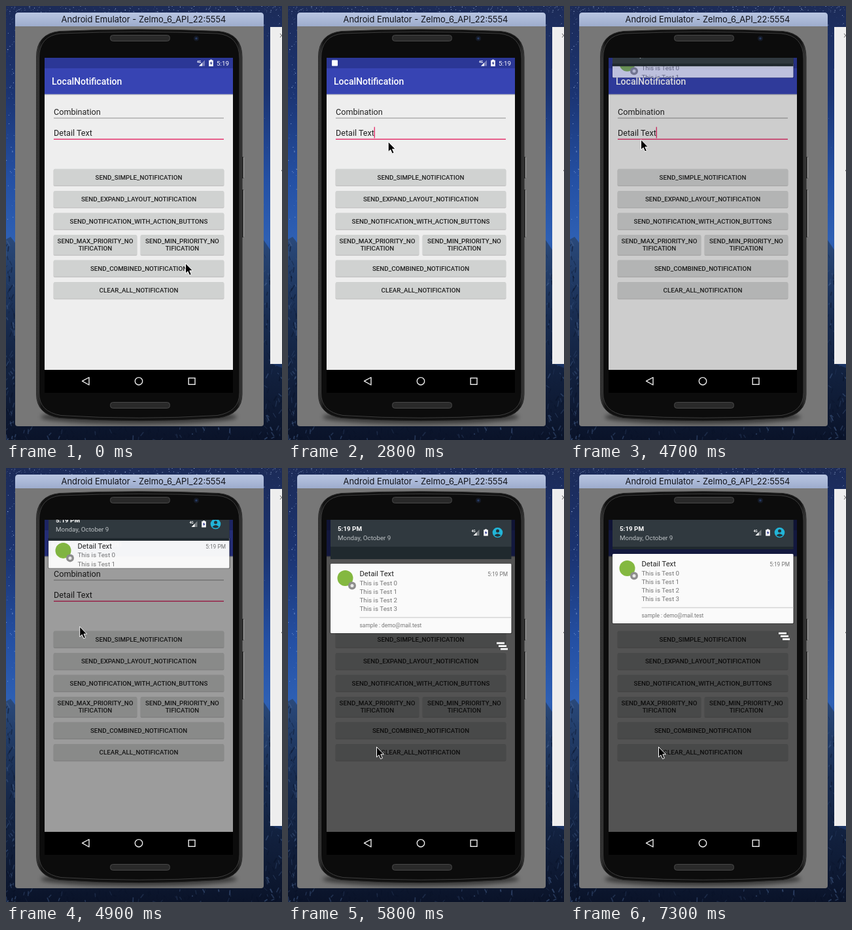
An HTML page for the animation above (7.4 s loop, 422 px wide and 662 px high).

```html
<!DOCTYPE html>
<html lang="en">
<head>
<meta charset="utf-8">
<title>Local notification demo</title>
<style>
  html, body { margin: 0; width: 100%; height: 100%; overflow: hidden; background: #0d1833; }
  svg { display: block; width: 422px; height: 662px; }
  text { font-family: Roboto, sans-serif; }
  .mid { text-anchor: middle; }
  .end { text-anchor: end; }
  .btn { font-size: 9.8px; font-weight: 500; fill: #202020; text-anchor: middle; }
  .field { font-size: 12.6px; fill: #212121; }
  .line { font-size: 9.8px; fill: #747474; }
  .small { font-size: 8.4px; fill: #757575; }
</style>
</head>
<body>
<svg viewBox="0 0 422 662" xmlns="http://www.w3.org/2000/svg">
  <defs>
    <linearGradient id="sky" x2="0" y2="1">
      <stop offset="0" stop-color="#1c2b58"/>
      <stop offset=".2" stop-color="#1b3472"/>
      <stop offset=".4" stop-color="#2450a4"/>
      <stop offset=".54" stop-color="#2e60b4"/>
      <stop offset="1" stop-color="#0d1833"/>
    </linearGradient>
    <linearGradient id="hill" x2="0" y2="1">
      <stop offset="0" stop-color="#2a4a7c"/>
      <stop offset=".4" stop-color="#182c50"/>
      <stop offset="1" stop-color="#0a1329"/>
    </linearGradient>
    <linearGradient id="bar" x2="0" y2="1">
      <stop offset="0" stop-color="#b9c6e2"/>
      <stop offset="1" stop-color="#9daccd"/>
    </linearGradient>
    <linearGradient id="rim">
      <stop offset="0" stop-color="#3c3c3c"/>
      <stop offset=".025" stop-color="#111"/>
      <stop offset=".975" stop-color="#111"/>
      <stop offset="1" stop-color="#3c3c3c"/>
    </linearGradient>
    <radialGradient id="ripple">
      <stop offset="0" stop-color="#aaa" stop-opacity=".5"/>
      <stop offset="1" stop-color="#aaa" stop-opacity=".2"/>
    </radialGradient>
    <filter id="blur" x="-20%" y="-100%" width="140%" height="300%"><feGaussianBlur stdDeviation="3"/></filter>
    <clipPath id="window"><rect x="14" y="31" width="380" height="610"/></clipPath>
    <clipPath id="hillClip"><path id="ridge" d="M0 356L7 352L14 361L60 390L380 350L394 357L404 372V545L422 552V662H0Z"/></clipPath>
    <clipPath id="screen"><rect x="59" y="79" width="288" height="476"/></clipPath>
    <clipPath id="cardClip"><rect id="cardCut" x="60" width="286"/></clipPath>
    <clipPath id="btnClip"><rect x="73" y="387.5" width="260" height="25" rx="1.5"/></clipPath>
    <g id="signal">
      <path d="M0 4.5V-4.5L-9 4.5Z" fill="#fff" fill-opacity=".35"/>
      <path d="M-4 4.5V-.5L-9 4.5Z" fill="#fff"/>
      <text x="-12" y="-.5" font-size="5" font-weight="700" fill="#fff">4G</text>
    </g>
    <g id="battery">
      <path d="M-3.3 -4.2H-1.4V-5.2H1.4V-4.2H3.3V5H-3.3Z" fill="#fff"/>
      <path d="M.7 -3L-1.8 .7H-.2V3.6L2 -.4H.5Z" fill="#29348c"/>
    </g>
  </defs>

  <rect width="422" height="662" fill="url(#sky)"/>
  <g id="stars" fill="#b7cdf2"/>
  <use href="#ridge" fill="url(#hill)"/>
  <g id="rocks" clip-path="url(#hillClip)"/>

  <rect x="404" y="32" width="19" height="514" fill="#eee"/>
  <path d="M419 42L424 48M419 48L424 42" stroke="#666"/>
  <circle cx="422" cy="251" r="1" fill="#555"/>

  <path d="M14 31V15Q14 10 19 10H389Q394 10 394 15V31Z" fill="url(#bar)"/>
  <path d="M14 31H394V637Q394 641 390 641H18Q14 641 14 637Z" fill="#777"/>
  <text class="mid" x="210.5" y="25" font-size="12.9" fill="#11131a" style="font-family: Inter, sans-serif">Android Emulator - Zelmo_6_API_22:5554</text>

  <g clip-path="url(#window)">
    <ellipse cx="203" cy="627" rx="150" ry="11" opacity=".5" filter="url(#blur)"/>
  </g>
  <path d="M363.2 231V262M363.2 281V352" stroke="#bbb"/>
  <path d="M361.8 230V263M361.8 280V353" stroke="#222" stroke-width="2"/>
  <path d="M46.5 78Q46.5 42 82 38.5Q203 33 325 38.5Q361 42 361 78V592Q361 623 325 628.5Q203 637 82 628.5Q46.5 623 46.5 592Z" fill="url(#rim)" stroke="#2b2b2b"/>
  <path d="M50.5 80Q50.5 45 84 42Q203 37 323 42Q357 45 357 80V590Q357 619 323 624.5Q203 632 84 624.5Q50.5 619 50.5 590Z" fill="#0c0c0c" stroke="#484848" stroke-width=".8"/>
  <g fill="#292929" stroke="#484848">
    <rect x="159.5" y="44.5" width="91" height="9" rx="4"/>
    <rect x="159.5" y="604.5" width="91" height="9" rx="4"/>
  </g>
  <circle cx="291" cy="49.5" r="4" fill="#151a25"/>
  <circle cx="291" cy="49.5" r="1.7" fill="#263a62"/>
  <rect x="59" y="79" width="288" height="511" fill="#000"/>
  <g fill="none" stroke="#eee" stroke-width="1.4">
    <path d="M127 566.5V578L116.5 572.2Z" stroke-linejoin="round"/>
    <circle cx="203" cy="572.3" r="5.7"/>
    <rect x="279.2" y="567.5" width="9.8" height="9.8"/>
  </g>

  <g clip-path="url(#screen)">
    <rect x="59" y="79" width="288" height="476" fill="#eee"/>
    <rect x="59" y="134" width="288" height="2" fill="#000" opacity=".15"/>
    <rect x="59" y="79" width="288" height="55.5" fill="#3744b3"/>
    <rect x="59" y="79" width="288" height="16" fill="#2b3796"/>
    <rect id="statusIcon" x="67" y="82.5" width="9" height="9" rx="1" fill="#fff"/>
    <use href="#signal" x="304" y="87"/>
    <use href="#battery" x="313.5" y="87"/>
    <text class="end" x="341" y="90.5" font-size="9.8" fill="#fff">5:19</text>
    <text x="70" y="120.3" font-size="14" font-weight="500" fill="#fff">LocalNotification</text>
    <text class="field" x="73" y="166">Combination</text>
    <text class="field" x="73" y="197.5">Detail Text</text>
    <path d="M73 171H333" stroke="#858585" stroke-width=".9"/>
    <path d="M73 203.2H333" stroke="#e5356f" stroke-width="1.4"/>
    <path id="caret" d="M132.3 184.5V201.5" stroke="#e5356f" stroke-width="1.4"/>
    <g id="buttons"/>
    <rect id="scrim" x="59" y="79" width="288" height="476"/>

    <g id="shade">
      <g id="clear" fill="#fff">
        <path d="M319 250.8h12v2.7h-12ZM322 255.3h12v2.7h-12ZM325 259.8h11v2.7h-11Z"/>
      </g>
      <g id="card" clip-path="url(#cardClip)">
        <rect id="cardShadow" x="64" width="279" rx="2" opacity=".3"/>
        <rect id="paper" x="65" width="276.5" rx="1.5" fill="#fafafa"/>
        <g id="note">
          <circle cx="87.5" cy="153" r="12" fill="#84b840"/>
          <circle cx="98" cy="164.5" r="6" fill="#8e8e8e"/>
          <circle cx="98" cy="164.5" r="2.5" fill="#e8e8e8"/>
          <text x="109.5" y="150" font-size="11.2" fill="#212121">Detail Text</text>
          <text class="small end" x="336" y="150">5:19 PM</text>
          <g id="lines"/>
          <path d="M109.5 213H341.5" stroke="#c4c4c4"/>
          <text class="small" x="109.5" y="228.3">sample : demo@mail.test</text>
        </g>
      </g>
      <rect id="shelf" x="65" y="70" width="276.5" fill="#20292e"/>
      <g id="header">
        <rect x="65" y="40" width="276.5" height="80" fill="#30393f"/>
        <text x="76" y="95.8" font-size="9.8" font-weight="700" fill="#fff">5:19 PM</text>
        <text x="76" y="109.8" font-size="9.8" fill="#bcc1c4">Monday, October 9</text>
        <use href="#signal" x="292.5" y="98.5"/>
        <use href="#battery" x="302.5" y="98.5"/>
        <circle cx="320.5" cy="98.5" r="7.8" fill="#22b5d8"/>
        <circle cx="320.5" cy="96" r="2.5" fill="#263238"/>
        <path d="M315.5 102.8Q320.5 97.5 325.5 102.8Q320.5 107 315.5 102.8Z" fill="#263238"/>
      </g>
    </g>
  </g>
  <path id="pointer" d="M0 0V15.5L3.5 12.3L6.1 18.2L8.9 17L6.3 11.3H11Z" fill="#000" stroke="#fff"/>
</svg>
<script>
const LOOP = 7400, STEP = 100;
const $ = id => document.getElementById(id);
const set = (id, attrs) => {
  for (const k in attrs) $(id).setAttribute(k, attrs[k]);
};
const clamp = (v, a = 0, b = 1) => Math.min(b, Math.max(a, v));
const part = (t, a, b) => clamp((t - a) / (b - a));
const ease = p => p * p * (3 - 2 * p);

let seed = 7;
const rand = (a = 0, b = 1) => a + (b - a) * (seed = seed * 16807 % 2147483647) / 2147483647;
const many = (n, make) => Array.from({ length: n }, (_, i) => make(i)).join('');
const star = (x, y) =>
  `<circle cx="${x}" cy="${y}" r="${rand(.25, .7)}" opacity="${rand(.3, .9)}"/>`;
const sideX = i => i % 2 ? rand(0, 14) : rand(394, 422);

$('stars').innerHTML =
  many(130, i => star(sideX(i), rand(0, 1) ** 1.4 * 340)) +
  many(160, () => star(rand(0, 422), rand(0, 10)));

// short slanted strokes for the rocky slopes
$('rocks').innerHTML = many(260, i => {
  const low = i % 3 === 0;
  const x = low ? rand(0, 422) : sideX(i), y = low ? rand(641, 662) : rand(355, 662);
  const color = i % 4 < 2 ? '#45608c' : '#081126';
  return `<path d="M${x} ${y}l${rand(-5, 5)} ${rand(2, 9)}" stroke="${color}" stroke-width="${rand(.6, 2)}" opacity="${rand(.2, .6)}"/>`;
});

function button(x, y, w, h, ...labels) {
  const mid = x + w / 2, first = y + h / 2 + 3.5 - (labels.length - 1) * 5.7;
  return `<rect x="${x - .5}" y="${y + .7}" width="${w + 1}" height="${h + .8}" rx="2" opacity=".17"/>` +
    `<rect x="${x}" y="${y}" width="${w}" height="${h}" rx="1.5" fill="#d0d2d1"/>` +
    labels.map((s, i) => `<text class="btn" x="${mid}" y="${first + i * 11.4}">${s}</text>`).join('');
}
$('buttons').innerHTML =
  button(73, 248.5, 260, 25, 'SEND_SIMPLE_NOTIFICATION') +
  button(73, 282, 260, 25, 'SEND_EXPAND_LAYOUT_NOTIFICATION') +
  button(73, 315.5, 260, 25, 'SEND_NOTIFICATION_WITH_ACTION_BUTTONS') +
  button(73, 349, 127, 30.5, 'SEND_MAX_PRIORITY_NO', 'TIFICATION') +
  button(206, 349, 127, 30.5, 'SEND_MIN_PRIORITY_NO', 'TIFICATION') +
  button(73, 387.5, 260, 25, 'SEND_COMBINED_NOTIFICATION') +
  button(73, 421, 260, 25, 'CLEAR_ALL_NOTIFICATION') +
  '<g clip-path="url(#btnClip)"><circle id="wave" cx="275" cy="400" fill="url(#ripple)"/></g>';
$('lines').innerHTML = many(4, i =>
  `<text class="line" x="109.5" y="${163.6 + i * 13.2}">This is Test ${i}</text>`);

// time, x, y of the pointer, and the easing that leads there
const route = [
  [0, 274.5, 392.5], [2000, 274.5, 392.5], [3400, 74.5, 86.5, ease], [4080, 74.5, 86.5],
  [4700, 108.5, 203.8], [5200, 119, 299], [5800, 135.5, 425.5], [LOOP, 135.5, 425.5]
];
function pointerAt(t) {
  const i = route.findIndex((k, n) => n && t <= k[0]);
  const [t0, x0, y0] = route[i - 1], [t1, x1, y1, curve = p => p] = route[i];
  const p = curve(part(t, t0, t1));
  return [x0 + (x1 - x0) * p, y0 + (y1 - y0) * p];
}

function draw(t) {
  const [x, y] = pointerAt(t);
  const pull = t < 4080 ? 0 : y;
  const over = 15 * part(pull, 317, 425.5) * (1 - ease(part(t, 5900, 6300)));
  const headShift = Math.min(0, (pull - 268) * .5);
  const cardShift = Math.min(0, pull - 269) + over;
  const headEnd = 120 + headShift;
  const top = 131 + cardShift;
  const bottom = Math.min(237, 109.5 + (pull - 204) * 1.14) + over;

  set('pointer', { transform: `translate(${x} ${y})` });
  set('statusIcon', { opacity: t >= 1400 ? 1 : 0 });
  set('caret', { opacity: t % 1000 >= 600 && t % 1000 < 900 ? 1 : 0 });
  set('wave', {
    r: 30 + 190 * part(t, 1100, 1500),
    opacity: t < 1200 ? 0 : 1 - part(t, 1400, 1800)
  });

  set('scrim', { opacity: .65 * part(pull, 177, 299) });
  set('shade', { visibility: pull > 120 ? 'visible' : 'hidden' });
  set('header', { transform: `translate(0 ${headShift})` });
  set('shelf', { height: Math.max(0, headEnd + 4 + over - 70) });
  set('card', { opacity: .7 + .3 * part(pull, 205, 245) });
  set('note', { transform: `translate(0 ${cardShift})` });
  const h = Math.max(0, bottom - top);
  set('paper', { y: top, height: h });
  set('cardShadow', { y: top + 1, height: h });
  const cut = Math.max(79, headEnd);
  set('cardCut', { y: cut, height: Math.max(0, bottom + 1 - cut) });
  set('clear', { opacity: part(pull, 312, 345), transform: `translate(0 ${over})` });
}

const start = performance.now();
function tick(now) {
  const t = Math.max(0, now - start) % LOOP;
  draw(Math.floor(t / STEP) * STEP);
  requestAnimationFrame(tick);
}
draw(0);
requestAnimationFrame(tick);
</script>
</body>
</html>
```
